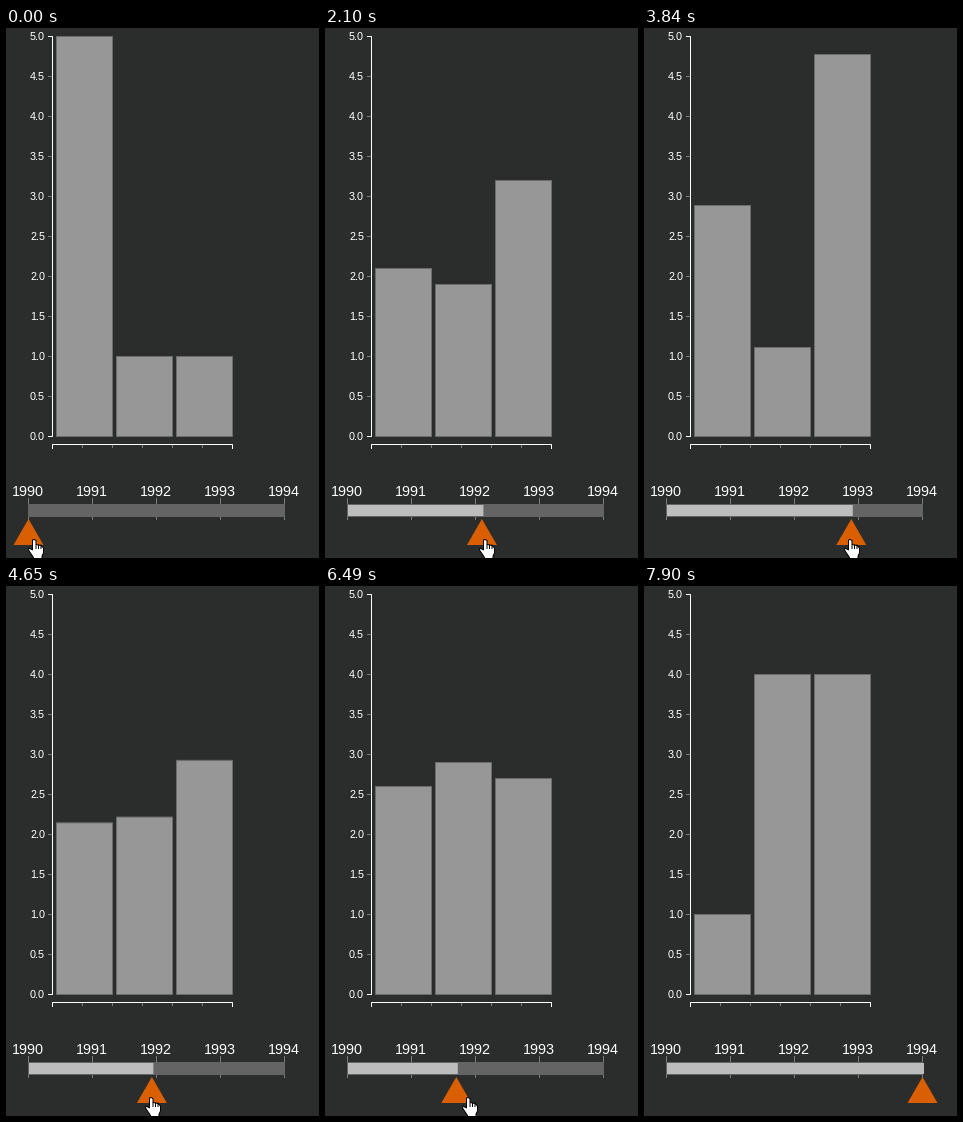
These frames come from a looping animation (313 px wide and 530 px high, 8060 ms). A matplotlib script:

```python
import numpy as np
import matplotlib.pyplot as plt
from matplotlib.animation import FuncAnimation
from matplotlib.patches import Polygon, Rectangle

W, H, DPI = 313, 530, 100
LOOP, STEP = 8060, 20
PX = 72 / DPI

BACK, BAR, EDGE = "#2b2d2c", "#979797", "#6c6c6c"
TRACK, FILLED, TICK, ORANGE = "#646464", "#bdbdbd", "#7c7c7c", "#d95f02"

FIRST_YEAR = 1990
VALUES = [(5, 4, 2, 3, 1), (1, 5, 2, 1, 4), (1, 2, 3, 5, 4)]
BASE, UNIT = 408.5, 80
SLIDER_X, YEAR_W = 22.5, 64

# Mouse strokes as (time, years after 1990); the slider rests between strokes
STROKES = [
    [(710, 0.2), (1280, 1.0375), (1670, 1.36), (1820, 1.75)],
    [(2100, 2.1), (2610, 3.07)],
    [(2910, 3.225), (3420, 3.89)],
    [(3690, 3.5), (3840, 2.8875), (5370, 0.775), (5520, 0.71)],
    [(5830, 0.82), (6490, 1.7), (7200, 3.28), (7900, 4)],
]
MOUSE_STEP = 140
HAND_OUT = 7620

HAND = np.array([(4.5, 1), (6, .5), (8, 1.5), (8, 5.5), (13, 6.5), (15.5, 9),
                 (15.5, 14), (14, 17), (14, 20.5), (5.5, 20.5), (5.5, 18.5),
                 (.5, 11), (1, 9), (4.5, 11)])
TRIANGLE = np.array([(0, 491), (15, 517), (-15, 517)])


def sample_strokes():
    """Split every stroke into mouse events of about equal length."""
    times, positions = [0], [0]
    for stroke in STROKES:
        for (t0, p0), (t1, p1) in zip(stroke, stroke[1:]):
            n = round((t1 - t0) / MOUSE_STEP) + 1
            times += list(np.linspace(t0, t1, n))
            positions += list(np.linspace(p0, p1, n))
    return times, positions


times, positions = sample_strokes()

plt.rcParams.update({"font.family": "Liberation Sans",
                     "text.hinting": "native", "text.hinting_factor": 1})
fig = plt.figure(figsize=(W / DPI, H / DPI), dpi=DPI, facecolor=BACK)
ax = fig.add_axes([0, 0, 1, 1])
ax.set(xlim=(0, W), ylim=(H, 0))
ax.axis("off")


def line(xs, ys, color, z=1):
    return ax.plot(xs, ys, color=color, lw=PX, zorder=z, snap=False,
                   solid_capstyle="butt", solid_joinstyle="miter")[0]


def label(x, baseline, text, size, align):
    ax.text(x, baseline, text, size=size * PX, color="white", ha=align,
            va="baseline")


def shape(points, color, z, edge="none"):
    return ax.add_patch(Polygon(points, fc=color, ec=edge, lw=PX, zorder=z,
                                snap=False))


def box(x, y, w, h, color, z, edge="none"):
    return ax.add_patch(Rectangle((x, y), w, h, fc=color, ec=edge, lw=PX,
                                  zorder=z, snap=False))


# Axes of the chart
for i in range(11):
    y = BASE - i * UNIT / 2
    line([42, 46], [y, y], TICK)
    label(39, y + 3.5, f"{i / 2:.1f}", 11, "right")
line([42, 46.5, 46.5, 42], [8.5, 8.5, BASE, BASE], "white")
for x in 46.5 + 30 * np.arange(1, 6):
    line([x, x], [417, 420], TICK)
line([46.5, 46.5, 226.5, 226.5], [421, 416.5, 416.5, 421], "white")

# Slider
for i in range(5):
    x = SLIDER_X + i * YEAR_W
    line([x, x], [470, 492], TICK)
    label(x - .5, 468, str(FIRST_YEAR + i), 14, "center")
box(22, 476, 257, 13, TRACK, 2)
filled = box(23, 477, 0, 11, FILLED, 3)
handle = shape(TRIANGLE, ORANGE, 4)

bars = [box(50.5 + 60 * i, BASE, 56, 0, BAR, 2, EDGE) for i in range(3)]
hand = shape(HAND, "white", 6, "black")
knuckles = [line([], [], "black", 7) for _ in range(3)]


def draw(frame):
    k = np.searchsorted(times, (frame + .5) * STEP, side="right") - 1
    moved, pos = times[k], positions[k]
    x = SLIDER_X + pos * YEAR_W

    for bar, row in zip(bars, VALUES):
        height = UNIT * np.interp(pos, range(5), row)
        bar.set_y(BASE - height)
        bar.set_height(height)

    filled.set_width(x + 1.5 - 23)
    filled.set_visible(pos > 0)
    handle.set_xy(TRIANGLE + [x, 0])

    # The pointer drifts against the handle and finally leaves the stage
    drift = np.interp(moved, [1280, 3840, 5370, 6490], [0, -7, -6, 6])
    left = np.floor(x + drift)
    top = 511 + max(0, moved - HAND_OUT) // 10
    hand.set_xy(HAND + [left, top])
    for i, knuckle in enumerate(knuckles):
        knuckle.set_data([left + 8 + 2.5 * i] * 2, [top + 5.5, top + 10])
    return [*bars, filled, handle, hand, *knuckles]


anim = FuncAnimation(fig, draw, frames=LOOP // STEP, interval=STEP,
                     repeat=True, repeat_delay=0, blit=False)
plt.show()
```
